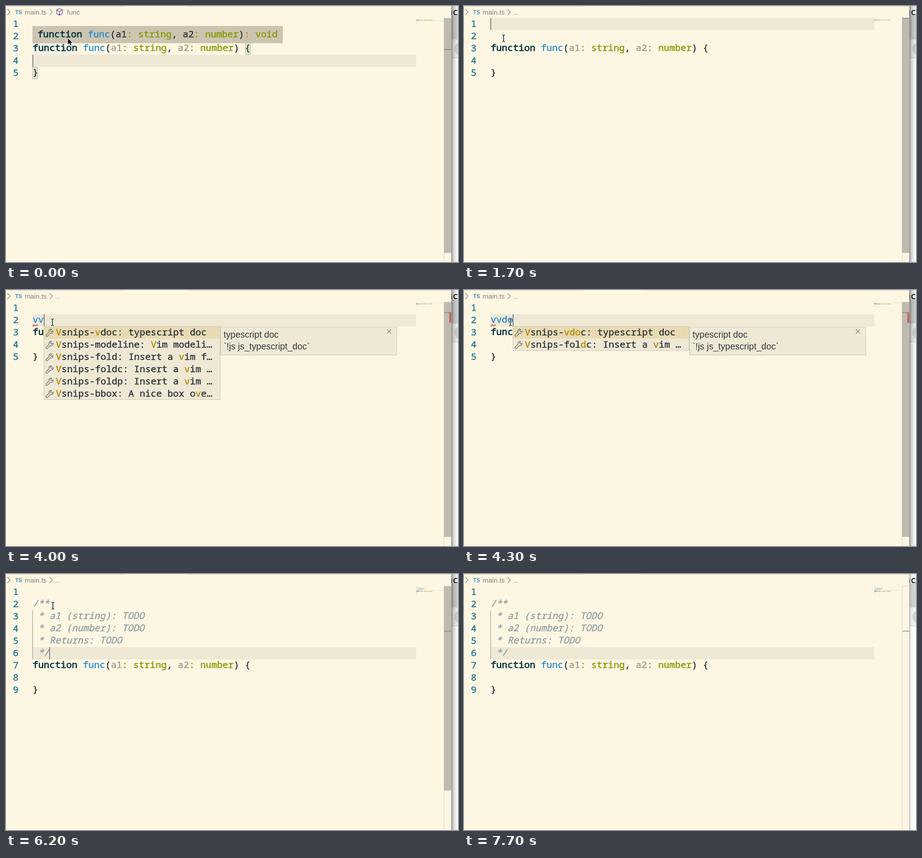
Write an HTML page with a canvas that moves like this. It is 993 by 564 pixels and loops after 7800 ms.

```html
<!DOCTYPE html>
<html lang="en">
<head>
<meta charset="utf-8">
<title>Doc snippet in an editor</title>
<style>
html, body { margin: 0; width: 100%; height: 100%; overflow: hidden; background: #fdf6e3; }
canvas { display: block; }
</style>
</head>
<body>
<canvas id="stage" width="993" height="564"></canvas>
<script>
const ctx = document.getElementById('stage').getContext('2d');
const LOOP = 7800, LEFT = 58.6, TOP = 26.2, CHAR = 12.27, LINE = 27;
const MONO = '20.45px "Noto Sans Mono", "DejaVu Sans Mono", monospace';
const SANS = '"Liberation Sans", Arial, sans-serif';
const INK = '#30343a', KEY = '#073642', BLUE = '#268bd2', GREEN = '#859900',
      FADED = '#a09a8c', COMMENT = '#93a1a1', GOLD = '#b58900', PAPER = '#fdf6e3', PANEL = '#eee8d5';

const signature = param => [
  ['function', KEY], [' func', BLUE], ['(', INK], ['a1', param], [': string', GREEN],
  [', ', INK], ['a2', param], [': number', GREEN], [')', INK]
];
const CODE = [[...signature(FADED), [' {', INK]], [], [['}', INK]]];
const HOVER = [...signature(INK), [': void', GREEN]];
const DOC = ['/**', ' * a1 (string): TODO', ' * a2 (number): TODO', ' * Returns: TODO', ' */']
  .map(s => [[s, COMMENT, 'italic ']]);

// matched letters are wrapped in brackets
const ITEMS = {
  vv: ['[V]snips-[v]doc: typescript doc', '[V]snips-modeline: [V]im modeli…',
    '[V]snips-fold: Insert a [v]im f…', '[V]snips-foldc: Insert a [v]im …',
    '[V]snips-foldp: Insert a [v]im …', '[V]snips-bbox: A nice box o[v]e…'],
  vvd: ['[V]snips-[vd]oc: typescript doc', '[V]snips-modeline: [V]im mo[d]eli…',
    '[V]snips-fol[d]: Insert a [v]im f…', '[V]snips-fol[d]c: Insert a [v]im …',
    '[V]snips-fol[d]p: Insert a [v]im …'],
  vvdo: ['[V]snips-[vdo]c: typescript doc', '[V]snips-fol[d]c: Insert a [v]im …'],
  vvdoc: ['[V]snips-[vdoc]: typescript doc', '[V]snips-fol[d]c: Insert a [v]im …']
};

const TYPED = [[0, ''], [3500, 'v'], [4000, 'vv'], [4200, 'vvd'], [4300, 'vvdo'], [4400, 'vvdoc']];
const ACTIVE = [[0, 4], [1400, 1], [2000, 2], [5300, 6]];
const CARET = [[0, 1], [500, 0], [1000, 1], [2300, 0], [3000, 1], [4900, 0], [5300, 1],
  [5700, 0], [6200, 1], [6700, 0], [7200, 1], [7700, 0]];
const POINTER = [[0, 'arrow'], [1200, 'beam'], [6400, 'arrow'], [6500, '']];
const PATH = [[0, 136, 71], [200, 109, 64], [500, 74, 58], [800, 74, 58], [900, 75, 56], [1200, 82, 40],
  [1400, 84, 40], [1600, 86, 59], [1700, 87, 71], [1800, 87, 71], [2100, 102, 71],
  [6100, 102, 71], [6200, 103, 70], [6300, 103, 70], [6400, 43, 7], [7800, 43, 7]];

const at = (steps, t) => steps.filter(s => s[0] <= t).pop()[1];
const lineTop = n => TOP + (n - 1) * LINE;

function mouseAt(t) {
  const i = PATH.findIndex(p => p[0] > t);
  const [t0, x0, y0] = PATH[i - 1], [t1, x1, y1] = PATH[i];
  const k = (t - t0) / (t1 - t0);
  return [Math.round(x0 + (x1 - x0) * k), Math.round(y0 + (y1 - y0) * k)];
}

function rect(x, y, w, h, color) {
  ctx.fillStyle = color;
  ctx.fillRect(x, y, w, h);
}

function frame(x, y, w, h, color) {
  ctx.strokeStyle = color;
  ctx.lineWidth = 1;
  ctx.strokeRect(x + .5, y + .5, w - 1, h - 1);
}

function stroke(points, color, width) {
  ctx.beginPath();
  points.forEach(([x, y]) => ctx.lineTo(x, y));
  ctx.strokeStyle = color;
  ctx.lineWidth = width;
  ctx.stroke();
}

function label(s, x, y, font, color) {
  ctx.font = font;
  ctx.fillStyle = color;
  ctx.fillText(s, x, y);
}

// a thin outline gives the regular face a medium weight
function mono(s, x, y, color, style = '') {
  label(s, x, y, style + MONO, color);
  ctx.strokeStyle = color;
  ctx.lineWidth = color === KEY ? .8 : .5;
  ctx.lineJoin = 'round';
  ctx.strokeText(s, x, y);
}

function code(tokens, x, y) {
  for (const [s, color, style] of tokens) {
    mono(s, x, y, color, style);
    x += s.length * CHAR;
  }
}

function minimap(lines, active) {
  const rowY = i => 26.3 + 1.9 * i;
  if (active > 1) rect(901, rowY(active - 1), 60, 1, '#e9e1cc');
  ctx.globalAlpha = .55;
  lines.forEach((tokens, i) => {
    let col = 0;
    for (const [s, color] of tokens) {
      for (const m of s.matchAll(/\S+/g)) {
        rect(901 + (col + m.index) * .92, rowY(i), m[0].length * .92, 1.3, color);
      }
      col += s.length;
    }
  });
  ctx.globalAlpha = 1;
}

function breadcrumb(inFunc) {
  const chevron = x => stroke([[x, 7], [x + 6, 13.5], [x, 20]], '#8a8680', 1.2);
  chevron(3);
  label('TS', 20, 18, 'bold 12px ' + SANS, '#4a94b4');
  label('main.ts', 41, 18.5, '15px ' + SANS, '#85827b');
  chevron(96);
  if (!inFunc) return label('...', 108, 18.5, '13px ' + SANS, '#77746e');
  const purple = '#652d90';
  stroke([[117.5, 5.5], [124, 8.5], [124, 16.5], [117.5, 20.5], [111, 16.5], [111, 8.5], [117.5, 5.5]], purple, 1.2);
  stroke([[111, 8.5], [117.5, 12], [124, 8.5]], purple, 1.2);
  stroke([[117.5, 12], [117.5, 20.5]], purple, 1.2);
  label('func', 134, 19, '15px ' + SANS, '#85827b');
}

function squiggle(x0, x1, y) {
  const points = [];
  for (let x = x0; x <= x1; x += .5) points.push([x, y + 1.5 * Math.sin((x - x0) * 1.05)]);
  stroke(points, '#e0392f', 1.4);
}

function wrench(x, y) {
  ctx.save();
  ctx.translate(x, y);
  ctx.rotate(Math.PI / 4);
  ctx.beginPath();
  ctx.moveTo(-2, 8);
  ctx.lineTo(-2, -1);
  ctx.bezierCurveTo(-6, -3, -5.5, -8, -2, -9);
  ctx.lineTo(-2, -5);
  ctx.lineTo(2, -5);
  ctx.lineTo(2, -9);
  ctx.bezierCurveTo(5.5, -8, 6, -3, 2, -1);
  ctx.lineTo(2, 8);
  ctx.arc(0, 8, 2, 0, Math.PI);
  ctx.strokeStyle = '#66645f';
  ctx.lineWidth = 1.2;
  ctx.stroke();
  ctx.restore();
}

function suggestions(items, x) {
  const top = 80, h = items.length * LINE;
  rect(x, top, 388, h, PANEL);
  rect(x, top, 388, LINE, '#e8dbb3');
  frame(x, top, 388, h, '#c9c5b9');
  items.forEach((item, i) => {
    const y = top + i * LINE;
    wrench(x + 12.5, y + 14.5);
    const tokens = item.split(/[\[\]]/).map((s, j) => [s, j % 2 ? GOLD : INK]);
    code(tokens, x + 26.6, y + 20);
  });
  const dx = x + 388;
  rect(dx, 81, 388, 63, PANEL);
  frame(dx, 81, 388, 63, '#c9c5b9');
  label('typescript doc', dx + 7, 105, '19.6px ' + SANS, '#36383a');
  label('`!js js_typescript_doc`', dx + 7, 131, '19.6px ' + SANS, '#36383a');
  stroke([[dx + 366, 87], [dx + 375, 96]], '#85817a', 1.1);
  stroke([[dx + 375, 87], [dx + 366, 96]], '#85817a', 1.1);
}

function backdrop(focused) {
  rect(979, 0, 14, 564, '#ffffff');
  rect(979, 0, 14, 21, '#f3f3f3');
  rect(979, 21, 14, 53, '#d2d2d2');
  rect(979, 74, 14, 41, '#f0f0f0');
  rect(979, 114, 14, 1, '#cfcfcf');
  ctx.beginPath();
  ctx.arc(999, 94, 14, 0, 7);
  ctx.fillStyle = '#d4d4d4';
  ctx.fill();
  mono('nc', 969, 20, '#222');
  const g = ctx.createLinearGradient(979, 0, focused ? 993 : 987, 0);
  g.addColorStop(0, `rgba(0,0,0,${focused ? .38 : .2})`);
  g.addColorStop(.35, `rgba(0,0,0,${focused ? .14 : .05})`);
  g.addColorStop(1, 'rgba(0,0,0,0)');
  rect(979, 0, 14, 564, g);
}

function pointer(kind, x, y) {
  if (kind === 'beam') {
    for (const [color, w] of [['rgba(255,255,255,.8)', 3], ['#2b2b2b', 1.3]]) {
      for (const side of [-1, 1]) {
        stroke([[x + 3 * side, y - 7.5], [x + side, y - 7], [x, y - 6],
          [x, y + 6], [x + side, y + 7], [x + 3 * side, y + 7.5]], color, w);
      }
    }
  } else if (kind === 'arrow') {
    const outline = [[0, 0], [0, 14], [3.2, 11], [5.6, 16.5], [8, 15.5], [5.7, 10.2], [10, 10], [0, 0]];
    stroke(outline.map(([a, b]) => [x + a, y + b]), '#fff', 2);
    ctx.fillStyle = '#111';
    ctx.fill();
  }
}

function draw(t) {
  const typed = at(TYPED, t), active = at(ACTIVE, t);
  const expanded = t >= 5300, inFunc = t < 1400, hover = t < 1300;
  const word = expanded ? '' : typed;
  const lines = expanded ? [[], ...DOC, ...CODE] : [[], word ? [[word, BLUE]] : [], ...CODE];

  backdrop(t < 7700);
  rect(0, 0, 979, 564, PAPER);
  rect(0, 0, 979, 1, '#d5cdbb');
  rect(260, 0, 140, 1, '#ece5d3');
  breadcrumb(inFunc);

  const y = lineTop(active);
  rect(58, y, 843, LINE, PANEL);
  if (hover) rect(58, 80, 99, 27, '#f4f2e5');
  if (inFunc) {
    for (const [x, top] of [[525, 80], [58, 134]]) {
      rect(x, top, 12, 27, 'rgba(0,100,0,.1)');
      frame(x, top, 12, 27, '#b9b9a9');
    }
  }
  if (t >= 5600) rect(58, 80, 1, 108, '#8f8d86');

  lines.forEach((tokens, i) => {
    mono(String(i + 1), 15.3, lineTop(i + 1) + 20.2, '#237893');
    code(tokens, LEFT, lineTop(i + 1) + 18.9);
  });
  minimap(lines, active);

  const bad = expanded || t < 3900 ? 0 : t < 4800 ? 1 : 5;
  if (bad) squiggle(58, 58 + bad * CHAR, 78);

  const col = expanded ? 3 : word.length;
  if (at(CARET, t)) rect(Math.round(58 + col * CHAR), y, 1.6, LINE, '#5f6f76');

  // overview ruler and scrollbar
  rect(962, TOP, 1, 538, '#ddd6c4');
  rect(962, 26, 17, 1, '#ddd6c4');
  ctx.globalAlpha = t < 6900 ? 1 : t < 7200 ? .5 : 0;
  rect(962, 27, 17, (expanded ? 477 : 544) - 27, '#bfbab0');
  ctx.globalAlpha = 1;
  if (t >= 3900 && t < 5600) rect(974, 49, 5, 23, '#c95d58');
  rect(963, Math.round(26 + (active - 1) * (expanded ? 19.8 : 22.9)), 16, 1.5, '#85857f');
  rect(978, 0, 1, 564, t < 7700 ? '#a5a198' : '#c2bdb1');

  if (hover) {
    rect(58, 44, 550, 38, '#ccc4b0');
    if (t >= 700) frame(58, 44, 550, 38, '#cdb38e');
    code(HOVER, 69.3, 68.5);
  }
  if (ITEMS[word]) suggestions(ITEMS[word], Math.round(58.4 + col * CHAR));

  pointer(at(POINTER, t), ...mouseAt(t));
}

function tick() {
  const t = performance.now() % LOOP;
  draw(Math.floor(t / 100) * 100);
  requestAnimationFrame(tick);
}
tick();
</script>
</body>
</html>
```
